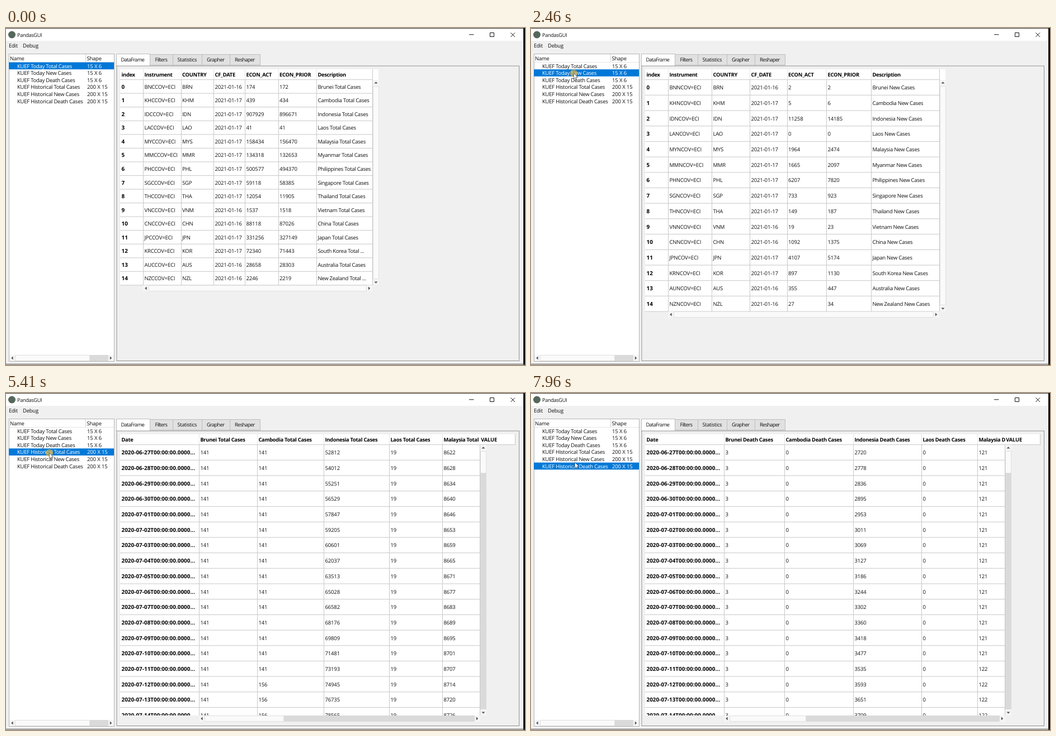
An HTML page that plays this animation: 928x604 px, repeating every 8000 ms.

```html
<!DOCTYPE html>
<html lang="en">
<head>
<meta charset="utf-8">
<title>PandasGUI</title>
<style>
html, body { margin: 0; width: 100%; height: 100%; overflow: hidden; background: #f0f0f0; }
svg { display: block; }
text { font: 9.5px "Open Sans", "Noto Sans", sans-serif; text-rendering: geometricPrecision; white-space: pre; }
text.b { font-size: 9.3px; font-weight: bold; }
text.key { font-size: 9.9px; font-weight: bold; }
text.ui { font-size: 9.2px; }
</style>
</head>
<body>
<svg width="928" height="604" viewBox="0 0 928 604">
  <g id="chrome"></g>
  <g id="view"></g>
  <circle id="click" r="6.7" fill="#f2b430" fill-opacity=".6"/>
  <path id="cursor" d="M.4.6V11.2L2.8 9 4.4 12.6 5.9 12 4.3 8.4H7.6Z" fill="#fff" stroke="#333" stroke-width=".7"/>
</svg>
<script>
const LOOP = 8000, GRID = '#c8c8c8', HEAD = '#e4e4e4', PANEL = '#f0f0f0';
const $ = id => document.getElementById(id);

const rect = (x, y, w, h, fill, stroke) =>
  `<rect x="${x}" y="${y}" width="${w}" height="${h}" fill="${fill}"${stroke ? ` stroke="${stroke}"` : ''}/>`;
const frame = (x, y, w, h, fill, stroke) => rect(x + .5, y + .5, w - 1, h - 1, fill, stroke);
const hline = (x, y, w, c = GRID) => rect(x, y, w, 1, c);
const vline = (x, y, h, c = GRID) => rect(Math.round(x), y, 1, h, c);

// Letter spacing differs for words, figures and capitals.
const spacing = (s, bold) => {
  const [words, figures, caps] = bold ? [-.27, .04, -.17] : [-.25, -.12, -.17];
  return /[a-z]/.test(s) ? words : /\d/.test(s) ? figures : caps;
};
const label = (s, x, mid, { cls = '', fill = '#111', gap = spacing(s, cls) } = {}) =>
  `<text class="${cls}" x="${x}" y="${(mid + 3.4).toFixed(1)}" fill="${fill}" letter-spacing="${gap}">${s}</text>`;
const bold = (s, x, mid) => label(s, x, mid, { cls: /\d/.test(s) ? 'key' : 'b', fill: '#000' });
const cell = (s, x, mid) => label(String(s), x, mid);

const arrow = (x, y, turn) =>
  `<path d="M-3 1.6H3L0 -1.8Z" fill="#555" transform="translate(${x} ${y}) rotate(${turn})"/>`;

function hbar(x1, x2, y, thumbEnd = x2 - 10) {
  return rect(x1, y, x2 - x1, 11, '#f5f5f5') +
    rect(x1 + 10, y, x2 - x1 - 20, 11, '#dadada') +
    frame(x1 + 10, y, thumbEnd - x1 - 10, 11, '#fafafa', '#e0e0e0') +
    arrow(x1 + 5, y + 5.5, -90) + arrow(x2 - 5.5, y + 5.5, 90);
}
function vbar(x, y1, y2, thumbEnd = y2 - 11) {
  return rect(x, y1, 11, y2 - y1, '#f5f5f5') +
    rect(x, y1 + 11, 11, y2 - y1 - 22, '#dadada') +
    frame(x, y1 + 11, 11, thumbEnd - y1 - 11, '#fafafa', '#e0e0e0') +
    arrow(x + 5.5, y1 + 5, 0) + arrow(x + 5.5, y2 - 5, 180);
}

// Window, menu and tabs
const tabs = [['DataFrame', 205.5, 197, 257], ['Filters', 266.5, 257, 298], ['Statistics', 306.5, 298, 350],
  ['Grapher', 359, 350, 400], ['Reshaper', 409, 400, 454]];
$('chrome').innerHTML =
  rect(0, 0, 928, 604, PANEL) + rect(0, 0, 928, 23, '#fff') + hline(0, 0, 928, '#333') +
  rect(925, 0, 3, 604, '#111') + hline(0, 602, 928, '#444') +
  '<circle cx="10.5" cy="12" r="6.5" fill="#56685c"/>' +
  label('PandasGUI', 20, 12.3, { cls: 'ui', gap: -.35 }) +
  '<path d="M828 11.8h8.5M865.5 8.5h7v7h-7zM902.5 8.5l7.5 7.5M910 8.5l-7.5 7.5" fill="none" stroke="#111"/>' +
  label('Edit', 5, 32) + label('Debug', 30, 32) +
  tabs.map(([s, x, l, r], i) =>
    frame(l, i ? 47 : 46, r - l + 1, i ? 20 : 23, i ? '#e1e1e1' : '#fff', '#bdbdbd') +
    label(s, x, 57, { cls: 'ui', gap: i === 2 ? -.3 : -.6 })).join('') +
  rect(198, 68, 719.5, 528.5, PANEL, '#939393');

// Sidebar
const kinds = ['Total', 'New', 'Death'];
const items = ['Today', 'Historical'].flatMap(span => kinds.map(kind => `KUEF ${span} ${kind} Cases`));
function sidebar(selected) {
  let out = frame(5, 46, 189, 552, '#fff', '#b4b4b4') + vline(142, 47, 14, '#d0d0d0') +
    hline(6, 61, 187, '#e4e4e4') + label('Name', 7, 54.8) + label('Shape', 144.5, 54.8) + hbar(6, 193, 586, 150);
  items.forEach((s, i) => {
    const top = 61.5 + 12.63 * i, mid = top + 6.6, fill = i === selected ? '#fff' : '#111';
    if (i === selected) out += rect(5, top, 188, 12.6, '#0078d7');
    out += label(s, 20, mid, { fill }) + label(i < 3 ? '15 X 6' : '200 X 15', 145, mid, { fill });
  });
  return out;
}

// Header cells, column lines and row lines shared by all tables
function grid(titles, cols, right, bottom, pitch) {
  let out = rect(204, 74, right - 204, bottom - 74, '#fff');
  cols.forEach((x, i) => {
    out += vline(x, 74, 19, HEAD) + vline(x, 93, bottom - 93) + bold(titles[i], x + 2.4, 83.5);
  });
  for (let y = 93; y <= bottom + 1; y += pitch) out += hline(204, (y - .9).toFixed(1), right - 204);
  return out;
}

// Daily tables: each country carries its total, the other figures follow from it.
const countries = `BN BRN 174 Brunei,KH KHM 439 Cambodia,ID IDN 907929 Indonesia,LA LAO 41 Laos,MY MYS 158434 Malaysia,
MM MMR 134318 Myanmar,PH PHL 500577 Philippines,SG SGP 59118 Singapore,TH THA 12054 Thailand,VN VNM 1537 Vietnam,
CN CHN 88118 China,JP JPN 331256 Japan,KR KOR 72340 South Korea,AU AUS 28658 Australia,
NZ NZL 2246 New Zealand`.split(',').map(s => {
  const [code, iso, total, ...name] = s.trim().split(' ');
  return { code, iso, total: +total, name: name.join(' ') };
});
const fresh = total => Math.floor(total * .0124);
const deaths = total => Math.floor(total * .02);
const figures = [
  n => [n, n - fresh(n)],
  n => [fresh(n), Math.floor(fresh(n) * 1.26)],
  n => [deaths(n), Math.floor(deaths(n) * .995)]
];
const heads = ['Instrument', 'COUNTRY', 'CF_DATE', 'ECON_ACT', 'ECON_PRIOR', 'Description'];
function dailyTable(kind) {
  const narrow = kind === 0, pitch = narrow ? 24.55 : 27.7, right = [655, 730, 736][kind];
  const cols = narrow ? [245, 312.5, 371, 427, 486.5, 555] : [245, 323, 391, 457.5, 528, 608];
  const bottom = Math.floor(93 + pitch * 15);
  let out = rect(right, 74, 11, 20, '#fff') + grid(heads, cols, right, bottom, pitch) + bold('index', 206.5, 83.5);
  countries.forEach(({ code, iso, total, name }, i) => {
    const mid = 93 + pitch * (i + .5);
    const day = [0, 9, 10, 13, 14].includes(i) ? 16 : 17;
    const last = narrow && name.includes(' ') ? '...' : 'Cases';
    const cells = [`${code}${'CND'[kind]}COV=ECI`, iso, '2021-01-' + day, ...figures[kind](total),
      `${name} ${kinds[kind]} ${last}`];
    out += bold(String(i), 206.5, mid) + cells.map((s, c) => cell(s, cols[c] + 2.4, mid)).join('');
  });
  return out + vline(right, 74, bottom - 74) + vbar(right + 1, 93, bottom) + hbar(245, right, bottom);
}

// Historical tables: one growth curve per column, by day
const totals = [
  () => 141,
  i => i < 15 ? 141 : 156,
  i => Math.round(52812 + 1180 * i + 19.7 * i * i),
  () => 19,
  i => Math.round(8622 + 6.1 * i)
];
const history = [
  { cols: [345, 449, 568, 685, 780], thumb: 497, curves: totals },
  { cols: [345, 448, 566, 682, 776], thumb: 497, curves: totals.map(f => i => f(i) - f(i - 1)) },
  { cols: [345, 453, 576, 698, 798], thumb: 492,
    curves: [() => 3, () => 0, i => Math.round(2720 + 58.2 * i), () => 0, i => i < 14 ? 121 : 122] }
];
function historyTable({ cols, thumb, curves }, kind) {
  const right = 848, bottom = 578, pitch = 27.7;
  const titles = cols.map((_, c) => `${countries[c].name} ${kinds[kind]} Cases`);
  let out = grid(titles, cols, right, bottom, pitch) + bold('Date', 206.5, 83.5);
  for (let i = 0; i < 18; i++) {
    const mid = 93 + pitch * (i + .5);
    const date = new Date(Date.UTC(2020, 5, 27 + i)).toISOString().slice(0, 10);
    out += bold(date + 'T00:00:00.0000...', 206.5, mid) +
      curves.map((f, c) => cell(f(i), cols[c] + 2.4, mid)).join('');
  }
  // Cover what runs past the visible area.
  return out + rect(204, bottom, 700, 15, PANEL) + rect(right, 74, 62, 19, '#fff') + bold('VALUE', 849.3, 83.5) +
    hline(right, 92.1, 62) + vline(910, 74, 19) + vline(847, 93, bottom - 93) +
    vbar(right, 93, bottom, 144) + hbar(345, right, bottom, thumb);
}

const views = [...kinds.map((_, kind) => dailyTable(kind)), ...history.map(historyTable)]
  .map((table, i) => sidebar(i) + table);

// Timeline
const switches = [0, 2460, 4030, 5410, 6820, 7570];
const clicks = [[2460, 2540], [3950, 4090], [5330, 5490], [6820, 6880], [7570, 7650]];

// The pointer glides in from the right, then steps from row to row.
const STEP = 76, ENTER = 990, ARRIVE = 1820;
const stops = [[1820, 87], [2070, 83], [2140, 80], [3320, 84], [3390, 88.5], [3560, 90], [3630, 91.7],
  [4800, 99], [4870, 106.5], [6420, 110], [6500, 114.5], [7050, 119], [7120, 123], [7190, 127], [7960, 123.5]];
function pointer(t) {
  if (t < ENTER) return null;
  if (t < ARRIVE) {
    const left = (1 - Math.min(1, Math.floor((t - ENTER) / STEP) / 10)) ** 2;
    return [63 + 835 * left, 94 + 35 * left];
  }
  const [at, y] = stops.filter(s => s[0] <= t).pop();
  return [at < 2140 ? 76 - (y - 80) * .8 : 76 + (y - 80) * .045, y];
}

let shown = -1;
function place(el, spot, dx = 0, dy = 0) {
  el.style.display = spot ? '' : 'none';
  if (spot) el.setAttribute('transform', `translate(${spot[0] + dx} ${spot[1] + dy})`);
}
function draw(now) {
  const t = now % LOOP;
  const current = switches.filter(s => s <= t).length - 1;
  if (current !== shown) $('view').innerHTML = views[shown = current];

  const spot = pointer(t);
  const pressed = clicks.some(([a, b]) => t >= a && t < b);
  place($('cursor'), spot);
  place($('click'), pressed && spot, .3, 1);
}

const start = performance.now();
function tick() {
  draw(performance.now() - start);
  requestAnimationFrame(tick);
}
tick();
</script>
</body>
</html>
```
